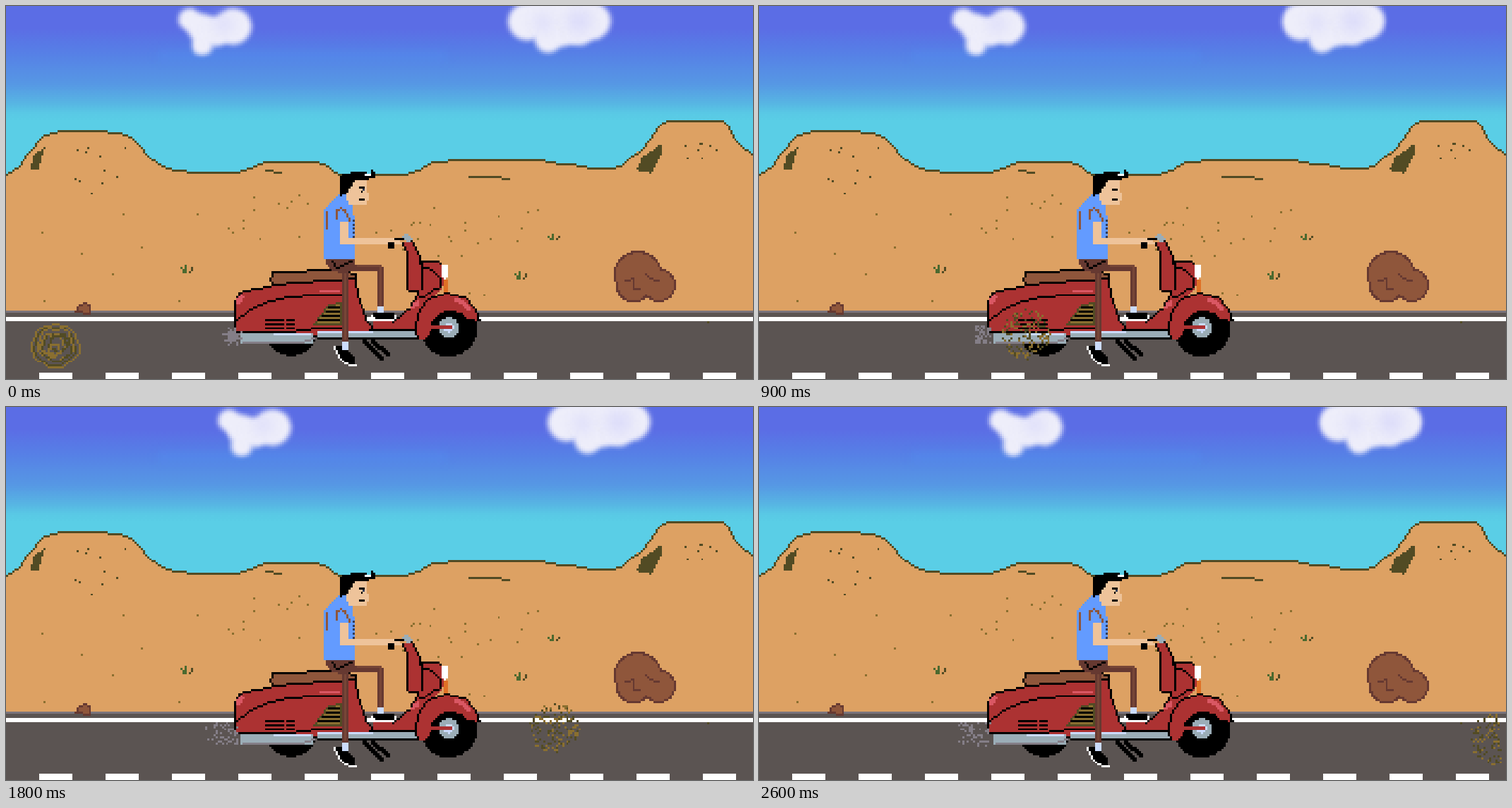
An HTML page with a canvas for the animation above (2700 ms loop, 1058 by 529 pixels).

```html
<!DOCTYPE html>
<html lang="en">
<head>
<meta charset="utf-8">
<title>Desert scooter</title>
<style>
html, body { margin: 0; width: 100%; height: 100%; overflow: hidden; background: #5b5452; }
canvas { display: block; width: 100%; height: 100%; image-rendering: pixelated; }
</style>
</head>
<body>
<canvas id="stage" width="360" height="180"></canvas>
<script>
// Shapes use stage units (1058 x 529) and are snapped to a 360 x 180 pixel grid.
const W = 360, H = 180, S = 1058 / W;
const RED = '#ac3232', PINK = '#d95763', STEEL = '#9badb7', PALE = '#cbdbfc', BROWN = '#8f563b',
  DARK = '#663931', OLIVE = '#524b24', GOLD = '#8a6f30', GREEN = '#4b692f', SAND = '#dda163',
  ROAD = '#5b5452', SMOKE = '#847e87', BLUE = '#639bff', SKIN = '#eec39a', BLACK = '#000', WHITE = '#fff';

const stage = document.getElementById('stage').getContext('2d');
let g = stage;

function layer(draw) {
  const c = document.createElement('canvas');
  c.width = W;
  c.height = H;
  g = c.getContext('2d');
  draw();
  g = stage;
  return c;
}

const points = s => s.split(' ').map(p => p.split(',').map(v => v / S));

// Catmull-Rom curve through the given points.
function smooth(pts) {
  return pts.flatMap((b, i) => {
    const a = pts[i - 1] || b, c = pts[i + 1] || b, d = pts[i + 2] || c;
    return [0, .25, .5, .75].map(t => [0, 1].map(k =>
      b[k] + t / 2 * (c[k] - a[k] + t * (2 * a[k] - 5 * b[k] + 4 * c[k] - d[k] +
        t * (3 * b[k] - a[k] - 3 * c[k] + d[k])))));
  });
}
const curve = s => smooth(points(s));

function dot(x, y, color) {
  g.fillStyle = color;
  g.fillRect(Math.floor(x / S), Math.floor(y / S), 1, 1);
}

function box(x1, y1, x2, y2, color) {
  const [a, b, c, d] = [x1, y1, x2, y2].map(v => Math.round(v / S));
  g.fillStyle = color;
  g.fillRect(a, b, Math.max(1, c - a), Math.max(1, d - b));
}

function trace(pts, color, size = 1) {
  g.fillStyle = color;
  for (let i = 1; i < pts.length; i++) {
    const [ax, ay] = pts[i - 1].map(Math.floor), [bx, by] = pts[i].map(Math.floor);
    const steps = Math.max(Math.abs(bx - ax), Math.abs(by - ay), 1);
    for (let k = 0; k <= steps; k++)
      g.fillRect(Math.round(ax + (bx - ax) * k / steps), Math.round(ay + (by - ay) * k / steps), size, size);
  }
}
const line = (s, color, size) => trace(points(s), color, size);

function fill(pts, color, outline) {
  g.fillStyle = color;
  for (let y = 0; y < H; y++) {
    const cuts = [], cy = y + .5;
    pts.forEach(([ax, ay], i) => {
      const [bx, by] = pts[(i + 1) % pts.length];
      if (ay <= cy !== by <= cy) cuts.push(ax + (cy - ay) / (by - ay) * (bx - ax));
    });
    cuts.sort((a, b) => a - b);
    for (let i = 0; i + 1 < cuts.length; i += 2) {
      const x = Math.round(cuts[i]);
      g.fillRect(x, y, Math.round(cuts[i + 1]) - x, 1);
    }
  }
  if (outline) trace([...pts, pts[0]], outline);
}
const shape = (s, color, outline) => fill(points(s), color, outline);

function ring(x, y, rx, ry = rx, wobble = 0) {
  return Array.from({ length: 49 }, (_, i) => {
    const a = i * Math.PI / 24, k = 1 + wobble * Math.sin(a * 5);
    return [(x + Math.cos(a) * rx * k) / S, (y + Math.sin(a) * ry * k) / S];
  });
}
const disc = (x, y, r, color) => fill(ring(x, y, r), color);

function random(seed) {
  return () => {
    seed = (seed * 16807 + 11) % 2147483647;
    return seed / 2147483647;
  };
}

function specks(seed, count, x, y, w, h, color) {
  const next = random(seed);
  for (let i = 0; i < count; i++) dot(x + next() * w, y + next() * h, color);
}

function drawSky() {
  const sky = g.createLinearGradient(0, 0, 0, 82);
  [[.13, '#5b6de5'], [.28, '#5680e6'], [.46, '#5698e4'], [.57, '#57b4e3'], [.63, '#59c9e5'], [.68, '#5acee6']]
    .forEach(([at, color]) => sky.addColorStop(at, color));
  g.fillStyle = sky;
  g.fillRect(0, 0, W, 82);
  g.filter = 'blur(2px)';
  g.fillStyle = 'rgba(80,148,245,.35)';
  g.fillRect(73, 22, 140, 4);
}

function drawClouds() {
  const puff = (x, y, r, color) => {
    g.fillStyle = color;
    g.beginPath();
    g.arc(x / S, y / S, r / S, 0, 7);
    g.fill();
  };
  g.filter = 'blur(1.3px)';
  for (const [x, y, r] of [[260, 19, 16], [277, 31, 21], [278, 55, 15], [298, 36, 21], [322, 29, 26],
    [738, 22, 27], [785, 12, 45], [830, 21, 27], [768, 47, 19], [812, 34, 22]]) puff(x, y, r, '#eeeefa');
  g.filter = 'blur(3px)';
  for (const [x, y, r] of [[308, 25, 13], [760, 24, 12], [812, 22, 18]]) puff(x, y, r, 'rgba(214,214,250,.75)');
}

function drawLand() {
  const ridge = curve('0,240 25,220 55,184 100,178 140,178 180,189 205,217 240,233 285,236 325,236 370,223 ' +
    '440,223 475,239 525,240 575,237 607,223 665,219 740,219 800,226 861,231 885,214 908,196 930,166 ' +
    '975,163 1015,164 1030,187 1058,212');
  fill([...ridge, ...points('1058,212 1058,433 0,433')], SAND);
  trace(ridge, OLIVE);
  shape('35,231 40,210 55,200 46,231', OLIVE);
  shape('893,233 901,215 930,194 930,206 914,237', OLIVE);
  line('370,234 389,236', OLIVE);
  line('656,242 694,243 713,245', OLIVE);

  specks(5, 11, 98, 198, 80, 70, OLIVE);
  specks(8, 8, 962, 195, 50, 50, OLIVE);
  specks(21, 13, 315, 262, 115, 70, GOLD);
  specks(34, 20, 545, 285, 210, 70, GOLD);
  specks(55, 16, 50, 290, 950, 130, GOLD);

  for (const [x, y] of [[255, 374], [775, 329], [728, 382]])
    for (const side of [-1, 0, 1])
      line(`${x + side * 7},${y - 4 + Math.abs(side) * 2} ${x + side * 5},${y + 3}`, side > 0 ? OLIVE : GREEN);

  box(0, 432, 1058, 529, ROAD);
  box(0, 432, 1058, 435, '#7b747b');
  box(0, 441, 1058, 447, WHITE);
  for (let x = 47; x < 1058; x += 32 * S) box(x, 520, x + 47, 529, WHITE);
  dot(995, 448, OLIVE);

  // Rocks: a dark silhouette with a slightly smaller brown one on top
  for (const [inset, color] of [[0, DARK], [3, BROWN]]) {
    disc(895, 381, 34 - inset, color);
    disc(925, 396, 24 - inset, color);
    disc(889, 396, 25 - inset, color);
  }
  line('878,388 888,386 890,400 898,402', DARK);
  line('908,382 913,387 924,388', DARK);
  shape('98,434 101,427 110,421 119,424 119,435', BROWN, DARK);
}

function drawScooter() {
  disc(404, 459, 37, BLACK);
  line('508,475 531,497', BLACK, 2);
  line('519,475 539,491', BLACK, 2);

  // Rear body
  const top = curve('325,432 330,407 360,401 400,391'), front = curve('494,389 498,407 504,427 511,444 521,458');
  fill([...top, ...front, ...points('521,466 333,466 324,459')], RED);
  trace(top, BLACK);
  trace(front, BLACK);
  line('324,432 324,460 333,465', BLACK);
  trace(curve('325,449 345,431 376,418 425,411 475,409'), BLACK);
  line('333,464 400,464 442,456 476,456', BLACK);
  shape('327,424 328,412 335,408 338,413 333,422', PINK);
  line('445,403 472,403', PINK);
  for (const y of [446, 451, 457]) {
    line(`368,${y} 392,${y}`, BLACK);
    line(`397,${y} 408,${y}`, BLACK);
  }
  shape('437,452 444,439 456,426 474,421 474,452', GOLD, OLIVE);
  for (let i = 0; i < 4; i++) line(`${458 - i * 5},${428 + i * 6} 472,${428 + i * 6}`, BLACK);

  // Seat
  shape('375,388 378,379 386,377 465,376 496,381 494,386 460,388 410,392 380,394', BROWN, BLACK);

  // Leg shield, floor and headlight
  const inner = curve('563,336 568,352 570,400 583,404 576,423 563,436 548,447');
  const outer = curve('573,331 582,345 588,364 605,362 619,369 623,386 617,400 592,424');
  fill([...inner, ...points('519,446 519,460 582,460 584,440'), ...outer.reverse()], RED);
  trace(inner, BLACK);
  line('573,331 581,343 587,358 590,380 589,402', BLACK);
  trace(curve('588,365 600,362 611,363 618,368'), BLACK);
  trace(curve('590,372 605,376 616,394 603,405 588,413'), BLACK);
  line('516,460 582,460', BLACK);
  shape('572,429 577,421 585,417 583,427', PINK);
  shape('617,366 624,366 626,374 625,386 619,388', WHITE);
  box(621, 389, 625, 405, '#df7126');
  shape('560,326 570,323 576,333 568,336', STEEL);

  // Running board and exhaust
  box(441, 461, 582, 471, STEEL);
  line('441,463 520,463', PALE);
  line('441,471 582,471', BLACK);
  box(333, 464, 435, 478, STEEL);
  line('380,467 430,467', PALE);
  line('336,478 420,478 437,473', SMOKE);

  // Front wheel and fender
  disc(627, 456, 41, BLACK);
  disc(627, 456, 14.5, STEEL);
  disc(627, 456, 7, PALE);
  const fender = curve('582,472 582,441 592,423 608,412 628,408 650,414 664,428 670,445');
  fill([...fender, ...curve('656,445 645,436 628,431 613,437 604,448 600,463 592,472')], RED);
  trace(fender, BLACK);
  line('636,416 645,419 653,428', PINK, 2);
  line('603,455 628,455', RED, 2);
}

function drawRider() {
  // Far leg
  box(488, 366, 532, 376, DARK);
  box(525, 369, 535, 427, DARK);
  line('497,370 529,370 529,425', '#774637');
  box(526, 426, 535, 436, PALE);
  shape('522,434 546,434 551,439 551,444 520,444', BLACK);
  line('519,440 525,444 547,444 551,440', WHITE);

  // Near leg
  shape('451,358 494,358 492,372 485,378 485,476 476,476 476,380 464,376 453,368', DARK);
  line('480,382 480,473', '#774637');
  line('462,364 470,372 488,364', BLACK);
  box(476, 476, 485, 488, PALE);
  shape('465,482 474,482 478,488 486,489 495,500 495,508 484,508 470,494', BLACK);
  line('465,484 469,493 476,501 486,509 494,509', WHITE);

  // Shirt and arm
  shape('450,360 450,289 470,268 482,266 485,279 492,286 494,360', BLUE);
  line('454,291 454,316', BROWN);
  line('470,300 470,290 475,287 481,289 485,304', BROWN);
  for (let y = 303; y < 328; y += 6) box(490, y, 494, y + 3, '#323c59');
  shape('473,305 485,305 485,329 552,330 560,334 560,338 474,338', SKIN);
  box(541, 335, 550, 343, BLACK);
  line('551,332 562,332', BLACK);
  box(547, 332, 555, 335, SKIN);

  // Head
  shape('480,266 484,246 511,245 511,262 515,270 511,282 486,282', SKIN);
  shape('473,270 473,240 496,235 511,236 516,244 494,248 480,268', BLACK);
  line('511,241 518,238', BLACK, 2);
  line('510,240 516,240', WHITE);
  line('502,274 508,274', BLACK);
}

function drawFace(frame) {
  if (frame === 9) line('500,261 508,261', BLACK);
  else {
    line('500,258 508,257', BLACK);
    dot(503, 262, BLACK);
    dot(506, 260, '#323c59');
  }
  line(frame === 13 ? '520,241 522,233' : '518,235 522,237 521,242', BLACK);
}

function drawSmoke(frame) {
  if (!frame) {
    disc(321, 469, 8, SMOKE);
    for (let a = .3; a < 6.5; a += Math.PI / 4)
      line(`321,469 ${321 + Math.cos(a) * 14},${469 + Math.sin(a) * 12}`, SMOKE);
    return;
  }
  // Two puffs, then a steady cloud
  const spread = frame < 18 ? Math.min(1, frame % 9 / 5) : 1;
  const left = 306 - 24 * spread, top = 454 - 7 * spread;
  specks(frame * 7919 + 31, 55, left, top, 328 - left, 480 - top, SMOKE);
}

const next = random(4217);
const twigs = Array.from({ length: 170 }, () => ({
  angle: next() * Math.PI * 2,
  radius: 35 * Math.sqrt(next()),
  color: next() < .5 ? GOLD : OLIVE
}));

// Frame, x and y of the bouncing tumbleweed.
const bounces = [[0, 70, 482], [5, 248, 461], [9, 378, 466], [13, 561, 482], [18, 777, 456], [23, 940, 455], [26, 1042, 472]];

function weedAt(frame) {
  const i = Math.max(1, bounces.findIndex(([f]) => f >= frame));
  const [a, ...from] = bounces[i - 1], [b, ...to] = bounces[i];
  return from.map((v, k) => v + (to[k] - v) * (frame - a) / (b - a));
}

function drawWeed(frame) {
  const [x, y] = weedAt(frame);
  if (!frame) {
    for (let i = 0; i < 7; i++) {
      const r = 33 - i * 4.2, a = i * 2.4;
      trace(ring(x + Math.cos(a) * i, y + Math.sin(a) * i, r, r * .93, .04 + i * .012), i % 2 ? OLIVE : GOLD);
    }
    return;
  }
  for (const { angle, radius, color } of twigs) {
    const a = angle + frame * .7, px = x + Math.cos(a) * radius;
    if (px < 1050) dot(px, y + Math.sin(a) * radius, color);
  }
}

const sky = layer(drawSky), clouds = layer(drawClouds);
const scene = layer(() => {
  drawLand();
  drawScooter();
  drawRider();
});

const start = performance.now();
let shown = -1;

function render() {
  const frame = Math.floor((performance.now() - start) % 2700 / 100);
  if (frame !== shown) {
    shown = frame;
    g.drawImage(sky, 0, 0);
    g.drawImage(clouds, Math.round(frame * 28 / 26), 0);
    g.drawImage(scene, 0, 0);
    drawFace(frame);
    drawSmoke(frame);
    drawWeed(frame);
  }
  requestAnimationFrame(render);
}
render();
</script>
</body>
</html>
```
